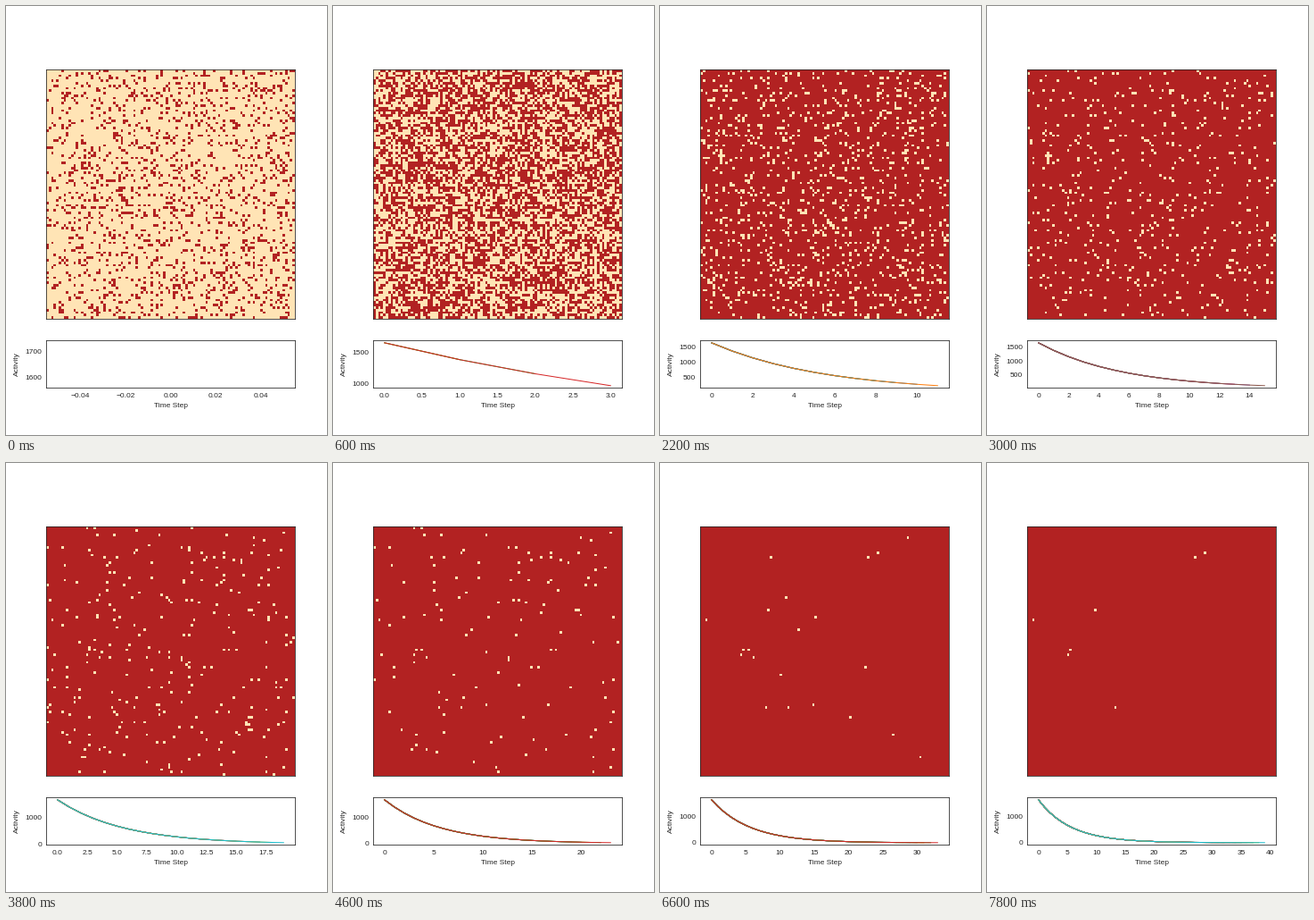
Write a matplotlib script that moves like this. It is 360x480 px and loops after 8 s.

```python
import numpy as np
import matplotlib.pyplot as plt
from matplotlib.animation import FuncAnimation
from matplotlib.colors import ListedColormap

W, H, DPI = 360, 480, 72
N, STEPS = 100, 40
RATE = 0.165  # share of the remaining cells that switch on in each step
INK = "0.15"

# (column, row) of the cells that are still off at the end
SURVIVORS = [(71, 10), (67, 12), (27, 33), (2, 37), (17, 49), (16, 51), (35, 72)]

plt.rcParams.update({
    "font.family": "Liberation Sans", "font.size": 10,
    "axes.labelsize": "small", "xtick.labelsize": "small", "ytick.labelsize": "small",
    "xtick.major.size": 0, "ytick.major.size": 0,
    "xtick.major.pad": 6, "ytick.major.pad": 5,
    "axes.edgecolor": INK, "axes.labelcolor": INK, "text.color": INK,
    "xtick.color": INK, "ytick.color": INK,
    "axes.linewidth": 0.8, "lines.linewidth": 1.0,
})


def switch_times():
    """Step at which each cell turns red: geometric decay in random order."""
    score = np.random.default_rng(7).random((N, N))
    for col, row in SURVIVORS:
        score[row, col] = 2
    rank = score.ravel().argsort().argsort().reshape(N, N)
    return np.floor(np.log(1 - rank / N**2) / np.log(1 - RATE)).astype(int)


times = switch_times()
activity = np.bincount(times.ravel(), minlength=STEPS)[:STEPS]

fig = plt.figure(figsize=(W / DPI, H / DPI), dpi=DPI, facecolor="white")


def pixel_axes(left, top, right, bottom):
    return fig.add_axes([left / W, 1 - bottom / H, (right - left) / W, (bottom - top) / H])


grid_ax = pixel_axes(45, 71.2, 324, 350.2)
grid_ax.set(xticks=[], yticks=[])
grid = grid_ax.imshow(times <= 0, cmap=ListedColormap(["moccasin", "firebrick"]),
                      vmin=0, vmax=1, interpolation="nearest", aspect="auto")
plot_ax = pixel_axes(45, 374.4, 324, 427.2)


def update(step):
    grid.set_data(times <= step)
    plot_ax.clear()
    # The curve so far is laid over all earlier ones in the next cycle colour
    for end in range(step + 1):
        plot_ax.plot(activity[:end + 1], color=f"C{end % 10}")
    plot_ax.set_xlabel("Time Step", labelpad=4)
    plot_ax.set_ylabel("Activity", labelpad=5)


anim = FuncAnimation(fig, update, frames=STEPS, interval=200,
                     init_func=lambda: update(0), repeat=True, repeat_delay=0)
plt.show()
```
